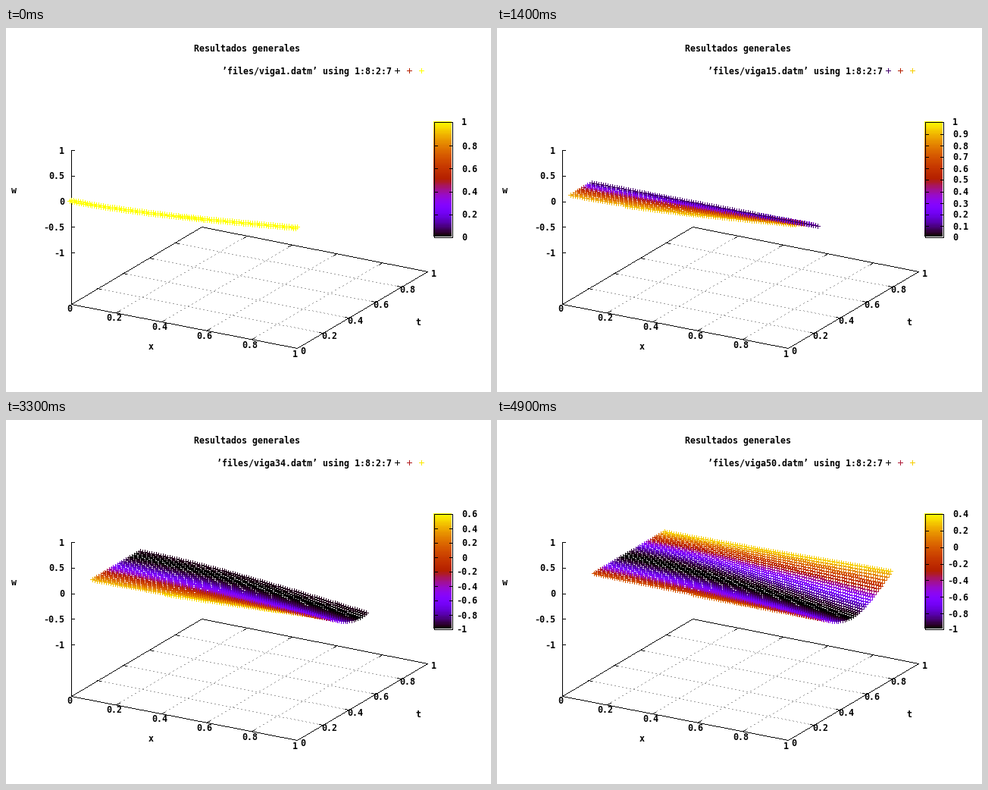
Animation, 640 px wide and 480 px high, one loop 5 s. Source, as a matplotlib script:

```python
import numpy as np
import matplotlib.pyplot as plt
from matplotlib.animation import FuncAnimation

W, H, DPI = 640, 480, 100
PX = 72 / DPI                      # one pixel in points
FRAMES, INTERVAL = 50, 100

plt.rcParams.update({
    "font.family": "DejaVu Sans Mono",
    "font.weight": "bold",
    "font.size": 11.63 * PX,
    "toolbar": "None",
})

fig = plt.figure(figsize=(W / DPI, H / DPI), dpi=DPI, facecolor="white")
ax = fig.add_axes([0, 0, 1, 1])
ax.axis("off")


def project(x, t, w):
    """Oblique view of the (x, t, w) box in pixels."""
    return 85.1 + 298 * x + 172 * t, 228.2 + 58.6 * x - 101.3 * t - 67.45 * w


def palette(f):
    """Black-violet-red-yellow ramp in 128 steps."""
    f = np.clip(np.floor(np.asarray(f, float) * 128) / 127, 0, 1)
    return np.stack([np.sqrt(f), f ** 3,
                     np.clip(np.sin(2 * np.pi * f), 0, 1)], axis=-1)


def marks(marker, size, **style):
    """Pixel-exact scatter without smoothing."""
    artist = ax.scatter([], [], marker=marker, s=(size * PX) ** 2, **style)
    artist.set_antialiased(False)
    artist.set_snap(False)
    return artist


def place(artist, x, y):
    artist.set_offsets(np.column_stack([np.floor(x), np.floor(y)]) + 0.5)


def line(p, q, color="black", dashed=False):
    """One-pixel-wide line drawn as a run of single pixels."""
    p, q = np.floor(p), np.floor(q)
    count = int(np.abs(q - p).max()) + 1
    x, y = np.linspace(p, q, count).T + 0.5
    if dashed:
        on = np.arange(count) % 5 < 2
        x, y = x[on], y[on]
    artist = marks("s", 1, color=color, linewidths=0, zorder=2)
    place(artist, x, y)
    return artist


def label(x, y, text, align="center"):
    """Text whose digits are centred vertically on y."""
    return ax.text(x, y + 4.5, text, ha=align, va="baseline")


# ---- fixed scene ----
def floor_point(x, t):
    return np.array(project(x, t, -2))


for v in (0.2, 0.4, 0.6, 0.8):
    for a, b in ((floor_point(v, 0), floor_point(v, 1)),
                 (floor_point(0, v), floor_point(1, v))):
        line(a, b, "#a0a0a0", dashed=True)
        step = (b - a) / np.hypot(*(b - a)) * 5
        line(a, a + step)
        line(b, b - step)

corners = [floor_point(*c) for c in ((0, 0), (1, 0), (1, 1), (0, 1), (0, 0))]
for a, b in zip(corners, corners[1:]):
    line(a, b)
line(corners[0], project(0, 0, 1))

for w in (1, 0.5, 0, -0.5, -1):
    px, py = project(0, 0, w)
    line((px, py), (px + 4, py))
    label(77, py + 0.5, f"{w:g}", "right")

for i in range(6):
    text = f"{i / 5:g}"
    label(83.5 + 59.5 * i, 370 + 11.8 * i, text)
    label(392 + 34.4 * i, 426 - 20.4 * i, text)

label(318, 27, "Resultados generales")
label(10.5, 214, "w")
label(191, 420, "x")
label(544, 387, "t")

BAR_L, BAR_R, BAR_T, BAR_B = 564, 588, 123, 275
ramp = palette(np.linspace(1, 0, BAR_B - BAR_T))[:, None, :]
ax.imshow(ramp, extent=(BAR_L, BAR_R, BAR_B, BAR_T), aspect="auto",
          interpolation="nearest", zorder=1)
bar = [(BAR_L, BAR_T), (BAR_R, BAR_T), (BAR_R, BAR_B), (BAR_L, BAR_B)]
for a, b in zip(bar, bar[1:] + bar[:1]):
    line(a, b)
ax.set_xlim(0, W)
ax.set_ylim(H, 0)

# ---- vibrating cantilever ----
POINTS = 101
BETA, SIGMA = 1.8751, 0.7341
xs = np.linspace(0, 1, POINTS)
mode = (np.cosh(BETA * xs) - np.cos(BETA * xs)
        - SIGMA * (np.sinh(BETA * xs) - np.sin(BETA * xs)))
mode *= 0.34 / mode[-1]


def surface(n):
    """Rows recorded up to step n; the oldest one is only partly kept."""
    start = max(0, 0.32 * n - 0.55)
    first = int(start)
    t = 0.016 * np.arange(first, n + 1) - 0.0053
    level = np.cos(2 * np.pi * (t + 0.003))
    x, tt = np.meshgrid(xs, t)
    px, py = project(x, tt, level[:, None] * mode)
    skip = int(round((start - first) * POINTS))
    return px.ravel()[skip:], py.ravel()[skip:], np.repeat(level, POINTS)[skip:]


def color_scale(lo, hi):
    """Range widened to whole ticks, and the tick step."""
    span = hi - lo
    power = 10.0 ** np.floor(np.log10(span))
    norm = span / power
    step = power * (0.2 if norm < 2 else 0.5 if norm < 5 else 1)
    return (np.floor(lo / step + 1e-9) * step,
            np.ceil(hi / step - 1e-9) * step, step)


cloud = marks("+", 7, linewidths=PX, zorder=3)
key = marks("+", 7, linewidths=PX, zorder=3)
place(key, [516, 532, 548], [56, 56, 56])
key_text = label(509, 57, "", "right")
bar_artists = []


def update(i):
    n = i + 1
    px, py, c = surface(n)
    lo, hi = (0.0, 1.0) if n <= 3 else (c.min(), c.max())
    bottom, top, step = color_scale(lo, hi)

    def shade(v):
        return palette((v - bottom) / (top - bottom))

    place(cloud, px, py)
    cloud.set_color(shade(c))
    key.set_color(shade(np.array([lo, (lo + hi) / 2, hi])))
    key_text.set_text(f"’files/viga{n}.datm’ using 1:8:2:7")

    while bar_artists:
        bar_artists.pop().remove()
    count = int(round((top - bottom) / step))
    for k in range(count + 1):
        y = BAR_B - np.floor((BAR_B - BAR_T) * k / count)
        value = round(bottom + k * step, 6) + 0.0
        left = 594 if value < 0 else 601
        bar_artists.append(label(left, y + 1, f"{value:g}", "left"))
        if 0 < k < count:
            bar_artists.append(line((BAR_L, y), (BAR_L + 4, y)))
            bar_artists.append(line((BAR_R - 4, y), (BAR_R, y)))
    return [cloud, key, key_text, *bar_artists]


anim = FuncAnimation(fig, update, frames=FRAMES, interval=INTERVAL,
                     init_func=lambda: [], repeat=True, repeat_delay=0,
                     blit=False)
plt.show()
```
